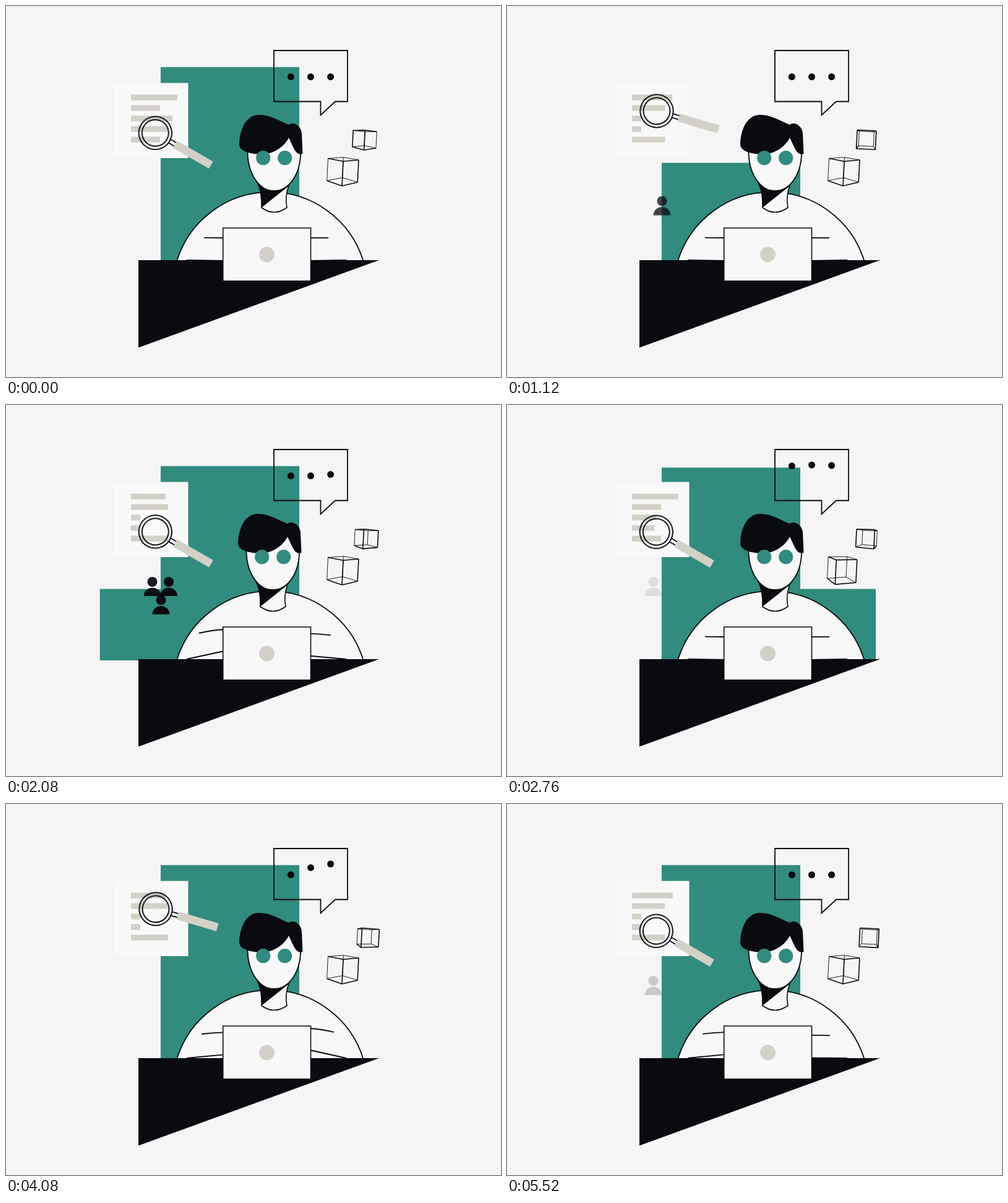
Animation, 800 px wide and 600 px high, one loop 5560 ms. Source, as an HTML page with a canvas:

```html
<!DOCTYPE html>
<html lang="en">
<head>
<meta charset="utf-8">
<title>Working at a desk</title>
<style>
html, body { margin: 0; width: 100%; height: 100%; overflow: hidden; background: #f5f5f5; }
canvas { display: block; }
</style>
</head>
<body>
<canvas id="stage" width="800" height="600"></canvas>
<script>
const LOOP = 5560, BEAT = 1120, SEARCH = 2800, SWING = 2860;
const INK = '#0a0b10', GREEN = '#318b7e', BEIGE = '#d3d1c7', WHITE = '#f8f8f8';
const c = document.getElementById('stage').getContext('2d');

// Eased rise from 0 to 1.
function ramp(t, start, span) {
  const x = Math.min(1, Math.max(0, (t - start) / span));
  return x * x * (3 - 2 * x);
}

// Eased rise at one time and fall at another.
const pulse = (t, on, off, rise, fall = rise) => ramp(t, on, rise) - ramp(t, off, fall);

// The same pulse at several starts.
const pulses = (t, starts, hold, span) =>
  starts.reduce((sum, s) => sum + pulse(t, s, s + hold, span), 0);

function draw(d, fill, stroke, width = 1.8) {
  const p = new Path2D(d);
  if (fill) { c.fillStyle = fill; c.fill(p); }
  if (stroke) { c.strokeStyle = stroke; c.lineWidth = width; c.stroke(p); }
}

function box(x, y, w, h, fill) {
  c.fillStyle = fill;
  c.fillRect(x, y, w, h);
}

function disc(x, y, r, fill) {
  c.fillStyle = fill;
  c.beginPath();
  c.arc(x, y, r, 0, 7);
  c.fill();
}

function ring(r, width, color) {
  c.strokeStyle = color;
  c.lineWidth = width;
  c.beginPath();
  c.arc(0, 0, r, 0, 7);
  c.stroke();
}

function backdrop(t) {
  const drop = 312 * pulses(t, [500, 2740], 420, 400);
  const left = 110 * pulses(t, [1600, 4080], 400, 400);
  const right = 122 * pulses(t, [80, 2320], 460, 400);
  box(250, 98.8 + drop, 224, 312.2 - drop, GREEN);
  box(250 - left, 297.5, left, 115.5, GREEN);
  box(474, 297.5, right, 114, GREEN);
}

function page(t) {
  box(174, 124.5, 120.5, 121.5, '#f9f9f9');
  const p = pulse(t, 960, 2670, 320, 100);
  const q = pulse(t, 40, 2725, 440, 75);
  const widths = [75 - 19 * p, 47 + 13 * p, 67 - 52 * q, 60 - 45 * q, 47 + 13 * p];
  widths.forEach((w, i) => box(202, 143.3 + 17 * i, w, 9.3, BEIGE));
}

function magnifier(t) {
  const up = pulse(t, 600, 1480, 480, 640);
  c.save();
  c.translate(241.3 + up * 0.7, 205.3 - up * 35.5);
  c.rotate((30 - 13.5 * up) * Math.PI / 180);
  box(27, -3, 11, 6, WHITE);
  draw('M27-3.2H38M27 3.2H38', null, INK);
  box(37, -6.7, 67, 13.4, BEIGE);
  ring(24, 5, 'rgba(10,11,16,.09)');
  ring(26.7, 1.8, INK);
  ring(21.4, 1.8, INK);
  c.restore();
}

function person(x, y, alpha) {
  c.globalAlpha = alpha;
  disc(x, y, 8, INK);
  draw(`M${x - 14} ${y + 23}C${x - 13} ${y + 5} ${x + 13} ${y + 5} ${x + 14} ${y + 23}Z`, INK);
  c.globalAlpha = 1;
}

// They arrive one by one and leave in the same order.
function people(t) {
  const visits = [{ on: 950, gap: 460, off: 2240 }, { on: 4090, gap: 360, off: 5020 }];
  [[250.5, 315.5], [263, 286], [236.5, 286]].forEach(([x, y], i) => {
    const alpha = visits.reduce((sum, v) => sum + pulse(t, v.on + v.gap * i, v.off + 160 * i, 250), 0);
    person(x, y, alpha);
  });
}

function bubble(t) {
  draw('M433 72H552V154.5H532L508.5 176.5V154.5H433Z', null, INK);
  for (let i = 0; i < 3; i++) {
    const lift = pulse(t, 80 + 125 * i, 480 + 155 * i, 220);
    disc(460.4 + 32.1 * i, 114.5 - 17.5 * lift, 5.5, INK);
  }
}

// Wire cube turning about its upright axis, seen slightly from above.
function cube(x, y, size, height, turn, pitch, roll, depth) {
  const cos = Math.cos(turn), sin = Math.sin(turn);
  const point = (a, b, h) => {
    const px = (a * cos - b * sin) * size / 2, pz = (a * sin + b * cos) * size / 2;
    const py = h * height / 2 - pz * pitch, k = depth / (depth + pz);
    return { x: x + (px - py * roll) * k, y: y + (py + px * roll) * k, z: pz };
  };
  const edge = (p, q) => {
    c.lineWidth = p.z + q.z < 0 ? 1.6 : 0.9;
    c.beginPath();
    c.moveTo(p.x, p.y);
    c.lineTo(q.x, q.y);
    c.stroke();
  };
  c.strokeStyle = INK;
  const corners = [[-1, -1], [1, -1], [1, 1], [-1, 1]];
  corners.forEach(([a, b], i) => {
    const [m, n] = corners[(i + 1) % 4];
    edge(point(a, b, -1), point(a, b, 1));
    edge(point(a, b, -1), point(m, n, -1));
    edge(point(a, b, 1), point(m, n, 1));
  });
}

function cubes(t) {
  const quarter = Math.PI / 2;
  const spin = ramp(t % BEAT, 375, 210);
  cube(544.3 - 20 * spin * (1 - spin), 265.7, 35, 36, quarter * (0.5 + spin), 0.2, 0.05, 260);
  const u = t / (2 * BEAT);
  const turn = 0.5 + u + 0.1 * Math.sin(2 * Math.PI * u);
  cube(579.5 + 6 * t / LOOP, 215.5, 27, 26.5, quarter * turn, 0.06, 0.05, 110);
}

function torso(t) {
  draw('M276.5 411A157.6 157.6 0 0 1 577 411', WHITE, INK);
  const l = pulse(t, 600, 980, 250, 120);
  const r = pulse(t, 120, 320, 200) + pulse(t, 540, 800, 180, 300);
  draw(`M${320 - 8 * l} ${374.7 - 5.7 * l}Q${335 - 2 * l} ${375 - 11 * l} 352 ${375 - 12 * l}`, null, INK);
  draw(`M${521 + 9 * r} ${375 - 6 * r}Q${507 + 3 * r} ${375 - 11 * r} 491 ${375 - 12 * r}`, null, INK);
  draw(`M292 411L352 ${412 - 14 * l}M550 411L491 ${412 - 14 * r}`, null, INK);
}

function head(t) {
  c.save();
  c.translate(-2 * pulse(t, 1300, 2200, 500, 400), 0);
  draw('M406 285Q414 302 413 326Q433 341 454 326Q450 309 458 287', WHITE, INK, 1.6);
  draw('M406 286Q414 302 413 326L457 291Z', INK);
  draw('M390.5 230C389 272 410 299 433 299C457 299 478 272 476 230L464 200H400Z', WHITE, INK);
  draw('M377 225C377 205 385 178 407 176C425 175 440 185 457 192C466 186 477 195 478 206'
    + 'L479.5 239C471 242 467 234 464 228L457 213C450 228 430 241 411 240C396 239 379 236 377 225Z', INK);
  disc(415.7, 245.7, 11.6, GREEN);
  disc(450.7, 245.7, 11.6, GREEN);
  c.restore();
}

function desk() {
  draw('M214 411H603L214 552.5Z', INK);
  draw('M350.7 359H492.5V444.8H350.7Z', WHITE, INK, 1.6);
  disc(421.5, 402, 12.5, BEIGE);
}

function frame(t) {
  box(0, 0, 800, 600, '#f5f5f5');
  backdrop(t);
  page(t % SEARCH);
  magnifier(t % SWING);
  people(t);
  bubble(t % BEAT);
  cubes(t);
  torso(t % BEAT);
  head(t % SEARCH);
  desk();
}

const start = performance.now();
function tick() {
  frame((performance.now() - start) % LOOP);
  requestAnimationFrame(tick);
}
tick();
</script>
</body>
</html>
```
